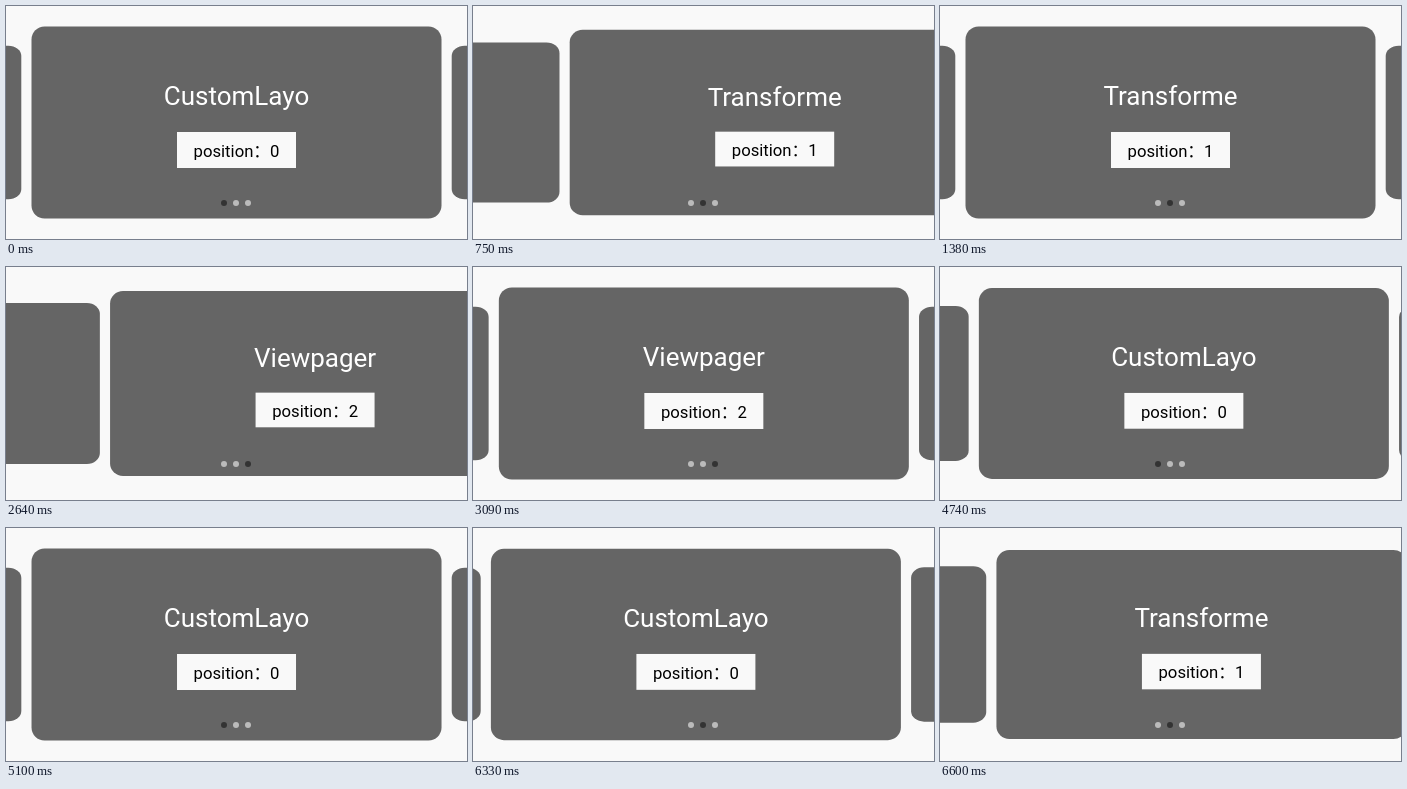
Animation of 461x233 px, one loop 6630 ms. Source, as an HTML page with a canvas:

```html
<!DOCTYPE html>
<html lang="zh-CN">
<head>
<meta charset="utf-8">
<title>Card carousel</title>
<style>
html, body { margin: 0; width: 100%; height: 100%; overflow: hidden; background: #f9f9f9; }
canvas { display: block; }
</style>
</head>
<body>
<canvas width="461" height="233"></canvas>
<script>
const ctx = document.querySelector('canvas').getContext('2d');
const LOOP = 6630, TICK = 30, SCROLL = 733;
const STRIDE = 420.2, MID_X = 230.5, MID_Y = 116.5;
const PAPER = '#f9f9f9', CARD = '#656565';
const FONT = 'Roboto, "Noto Sans CJK SC", "Noto Sans CJK", sans-serif';
const titles = ['CustomLayo', 'Transforme', 'Viewpager'];

// Each slide: when it becomes visible, and when its scroll clock began
const slides = [
  { show: 570, from: 538 },
  { show: 2520, from: 2437 },
  { show: 4380, from: 4376 },
  { show: 6330, from: 6312 }
];

// Viscous fluid easing: short quadratic start, long exponential tail
function fluid(p) {
  const x = 8 * p, knee = Math.exp(-1);
  return x < 1 ? x - 1 + Math.exp(-x) : knee + (1 - knee) * (1 - Math.exp(1 - x));
}
const ease = p => fluid(Math.min(p, 1)) / fluid(1);

function text(str, y, size, color) {
  ctx.font = `${size}px ${FONT}`;
  ctx.fillStyle = color;
  ctx.fillText(str, 0, y);
}

function drawCard(page, offset) {
  const index = (page + 3) % 3;
  ctx.save();
  ctx.translate(MID_X + offset * STRIDE, MID_Y);
  ctx.scale(1, 1 - 0.2 * Math.min(Math.abs(offset), 1));
  ctx.fillStyle = CARD;
  ctx.beginPath();
  ctx.roundRect(-205, -96, 410, 192, 13);
  ctx.fill();
  ctx.fillStyle = PAPER;
  ctx.fillRect(-59.5, 9.5, 119, 36);
  text(titles[index], -17.5, 26, '#fff');
  text('position：' + index, 34.3, 16.7, '#000');
  ctx.restore();
}

function draw(t) {
  const started = slides.filter(s => t >= s.show);
  const target = started.length;
  const scroll = target && target - 1 + ease((t - started[target - 1].from) / SCROLL);

  ctx.fillStyle = PAPER;
  ctx.fillRect(0, 0, 461, 233);
  ctx.textAlign = 'center';
  const near = Math.round(scroll);
  for (let page = near - 1; page <= near + 1; page++) drawCard(page, page - scroll);

  for (let i = 0; i < 3; i++) {
    ctx.fillStyle = i === target % 3 ? '#333' : '#bbb';
    ctx.beginPath();
    ctx.arc(218 + 12 * i, 197, 3, 0, 2 * Math.PI);
    ctx.fill();
  }
}

const begin = performance.now();
function frame() {
  const t = (performance.now() - begin) % LOOP;
  draw(Math.floor(t / TICK) * TICK);
  requestAnimationFrame(frame);
}
frame();
</script>
</body>
</html>
```
